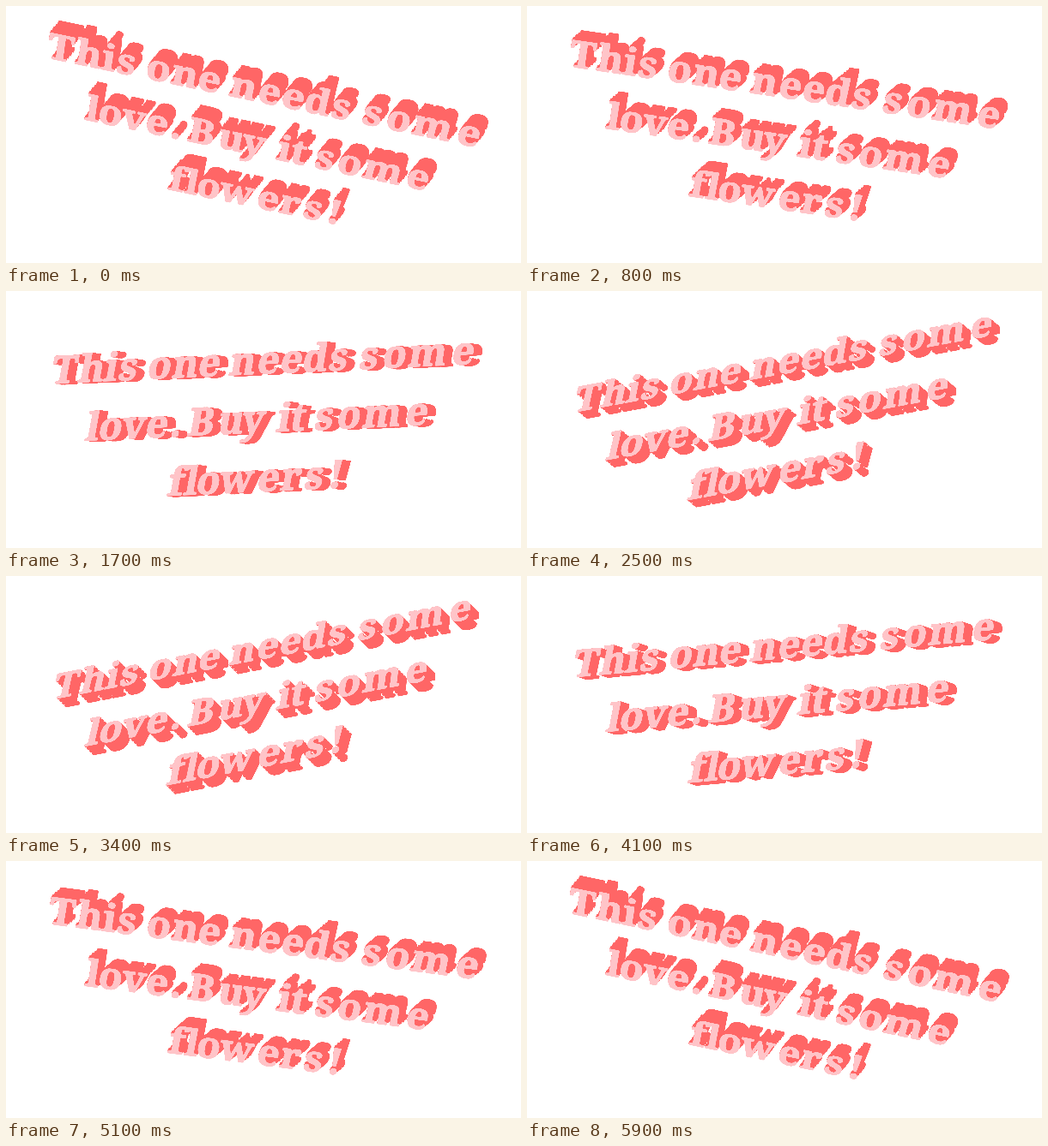
These frames come from a looping animation (600x300 px, 6000 ms). An HTML page without scripts:

```html
<!DOCTYPE html>
<html lang="en">
<head>
<meta charset="utf-8">
<title>Swaying message</title>
<style>
  html, body { margin: 0; width: 100%; height: 100%; overflow: hidden; background: #fff; }
  .solid, .crisp, .sway, .stage { display: block; width: 600px; height: 300px; }
  .defs { position: absolute; }
  .crisp { filter: url(#crisp); }
  .sway {
    transform-origin: 256px 167px;
    animation: sway 3s ease-in-out infinite alternate;
  }
  /* Each shadow doubles the one before it, giving a solid 15-layer extrusion. */
  .solid { animation: extrude 3s ease-in-out infinite alternate; }
  text {
    font: 900 45px "Noto Serif", serif;
    font-variant-ligatures: none;
    fill: #ffc4c8;
    stroke: #ffc4c8;
    stroke-width: 1.2px;
    stroke-linejoin: round;
  }

  @keyframes sway {
    from { transform: perspective(2000px) skewY(11.8deg) rotateX(-26deg); }
    to { transform: perspective(2000px) skewY(-11.8deg) rotateX(26deg); }
  }
  @keyframes extrude {
    from {
      filter: drop-shadow(.8px -.82px 0 #f66) drop-shadow(1.6px -1.64px 0 #f66)
        drop-shadow(3.2px -3.28px 0 #f66) drop-shadow(6.4px -6.56px 0 #f66);
    }
    to {
      filter: drop-shadow(.8px .82px 0 #f66) drop-shadow(1.6px 1.64px 0 #f66)
        drop-shadow(3.2px 3.28px 0 #f66) drop-shadow(6.4px 6.56px 0 #f66);
    }
  }
</style>
</head>
<body>
<svg class="defs" width="0" height="0">
  <!-- Steepens alpha so the lettering keeps hard edges while it tilts. -->
  <filter id="crisp" x="0" y="0" width="1" height="1" color-interpolation-filters="sRGB">
    <feComponentTransfer><feFuncA type="linear" slope="5" intercept="-2"/></feComponentTransfer>
  </filter>
</svg>
<div class="solid">
  <div class="crisp">
    <div class="sway">
      <svg class="stage" viewBox="0 0 600 300">
        <g transform="translate(0 98) skewX(-10)">
          <text x="50 82 112 129">This</text>
          <text x="163 192 222">one</text>
          <text x="259 291 318 344 375">needs</text>
          <text x="411 438 468 519">some</text>
        </g>
        <g transform="translate(0 167) skewX(-10)">
          <text x="91 106 133 161 190">love.</text>
          <text x="210 245 273">Buy</text>
          <text x="314 329">it</text>
          <text x="358 384 414 464">some</text>
        </g>
        <g transform="translate(0 236) skewX(-10)">
          <text x="187 206 220 247 291 318 346 373">flowers!</text>
        </g>
      </svg>
    </div>
  </div>
</div>
</body>
</html>
```
